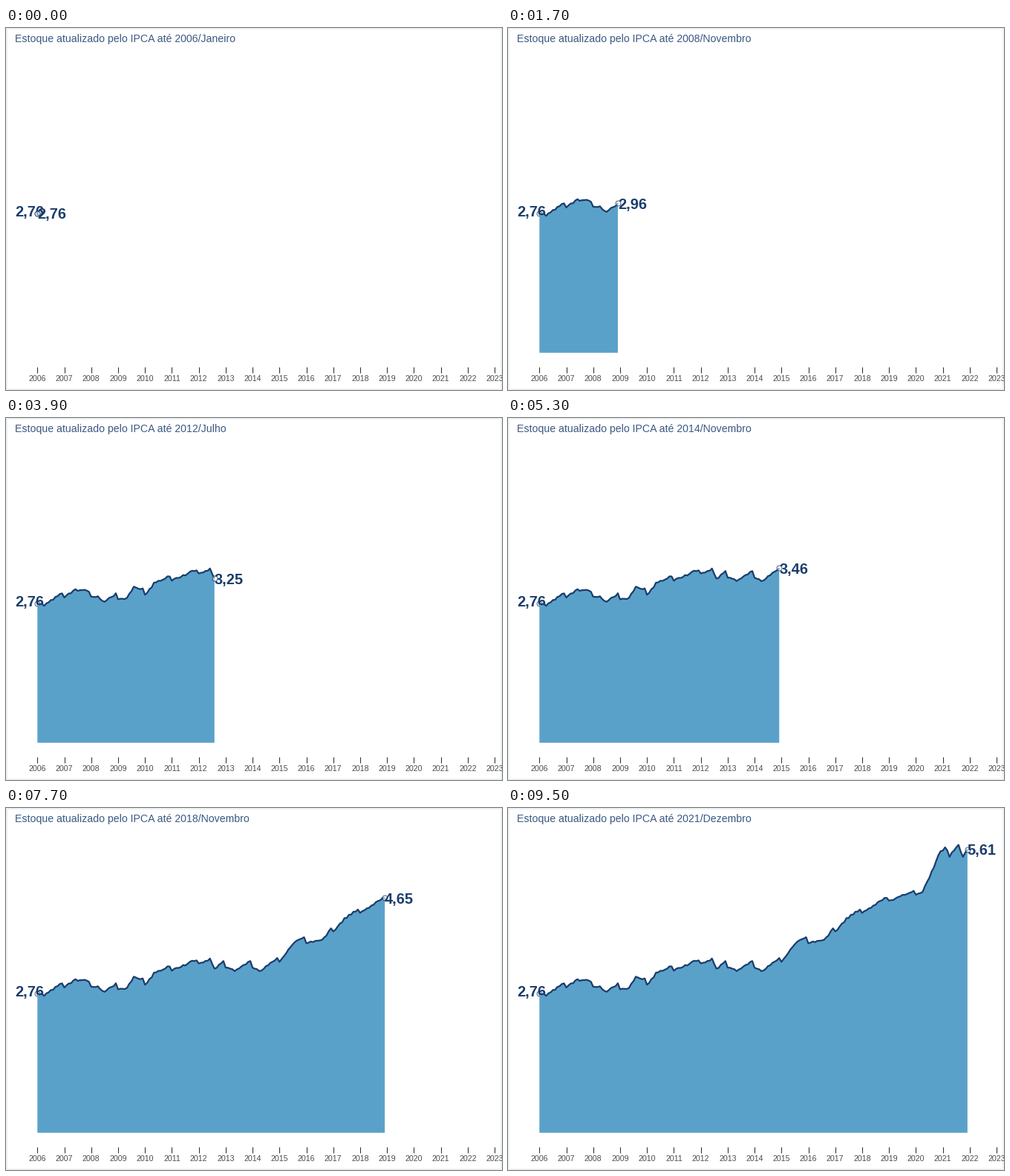
Recreate the animation shown at these times as a matplotlib script. Size 668 by 488 pixels, loop 9600 ms.

```python
import matplotlib.pyplot as plt
import numpy as np
from matplotlib.animation import FuncAnimation
from matplotlib.patches import Polygon, Rectangle

W, H, DPI = 668, 488, 100
FRAMES, INTERVAL = 96, 100
PT = 72 / DPI  # points per pixel

NAVY, BLUE = "#1a3c6b", "#5aa1c9"
X0, YEAR_W = 42.3, 36.22
BASE, UNIT = 437.8, 68.1

MONTHS = ["Janeiro", "Fevereiro", "Março", "Abril", "Maio", "Junho", "Julho",
          "Agosto", "Setembro", "Outubro", "Novembro", "Dezembro"]

# Turning points of the curve: month since January 2006, value.
TURNS = [(0, 2.76), (3, 2.71), (17, 3.04), (27, 2.90), (30, 2.79), (35, 2.96),
         (40, 2.87), (43, 3.09), (48, 2.93), (52, 3.17), (65, 3.32),
         (77, 3.45), (79, 3.25), (83, 3.40), (88, 3.20), (95, 3.40),
         (99, 3.20), (107, 3.46), (116, 3.81), (127, 3.82), (137, 4.25),
         (155, 4.65), (171, 4.77), (181, 5.65), (183, 5.46), (187, 5.70),
         (189, 5.46), (191, 5.61)]


def stock_curve():
    """Turning points joined by a yearly climb and a little noise."""
    at, level = np.array(TURNS).T
    month = np.arange(at[-1] + 1)
    rng = np.random.default_rng(4)
    wiggle = 0.10 * (month % 12) / 11 + rng.uniform(-0.02, 0.02, month.size)
    # Cancel the wiggle at the turning points so they stay exact.
    wiggle -= np.interp(month, at, wiggle[at.astype(int)])
    return np.interp(month, at, level) + wiggle


value = stock_curve()
count = value.size
xs = X0 + YEAR_W * np.arange(count) / 12
ys = BASE - UNIT * value

fig = plt.figure(figsize=(W / DPI, H / DPI), dpi=DPI, facecolor="white")
ax = fig.add_axes([0, 0, 1, 1])
ax.set(xlim=(0, W), ylim=(H, 0))
ax.axis("off")


def text(x, y, s, size, color, **kw):
    return ax.text(x, y, s, fontsize=size * PT, color=color,
                   family="Liberation Sans", va="baseline", **kw)


def marker(x, y, z):
    return ax.plot([x], [y], "o", ms=7 * PT, mfc=(1, 1, 1, 0.5), mec=NAVY,
                   mew=0.8 * PT, zorder=z)[0]


def comma(v):
    return f"{v:.2f}".replace(".", ",")


ax.add_patch(Rectangle((1, 1), W - 2, H - 2, fill=False, ec="#ebf0f1",
                       lw=2 * PT, zorder=0))
for i in range(18):
    x = X0 + YEAR_W * i
    ax.plot([x, x], [457.3, 464.6], color="#333333", lw=1.1 * PT,
            solid_capstyle="butt", zorder=1)
    text(x, 476.5, str(2006 + i), 10.6, "#4d4d4d", ha="center")

title = text(12.5, 19.5, "", 14.1, "#3a5882")

# The opening value sits beneath the area.
marker(xs[0], ys[0], 2)
text(32, 254, comma(value[0]), 20, NAVY, weight="bold", ha="center", zorder=3)

area = ax.add_patch(Polygon([[X0, BASE]] * 3, fc=BLUE, lw=0, zorder=4))
line, = ax.plot([], [], color=NAVY, lw=2.2 * PT, zorder=5,
                solid_capstyle="butt", solid_joinstyle="round")
tip = marker(xs[0], ys[0], 6)
label = text(0, 0, "", 20, NAVY, weight="bold", zorder=7)


def draw(k):
    pos = k * (count - 1) / (FRAMES - 1)
    now, end = int(np.floor(pos)), int(np.ceil(pos))
    year, month = divmod(now, 12)
    title.set_text("Estoque atualizado pelo IPCA até "
                   f"{2006 + year}/{MONTHS[month]}")

    px, py = xs[:end + 1], ys[:end + 1]
    top = np.column_stack([px, py])
    area.set_xy(np.vstack([[px[0], BASE], top, [px[-1], BASE]]))
    line.set_data(px, py)
    tip.set_data([px[-1]], [py[-1]])
    label.set_position((px[-1], py[-1] + 7.5))
    label.set_text(comma(value[end]))
    return title, area, line, tip, label


anim = FuncAnimation(fig, draw, frames=FRAMES, interval=INTERVAL,
                     init_func=lambda: draw(0), repeat=True, repeat_delay=0)
plt.show()
```
